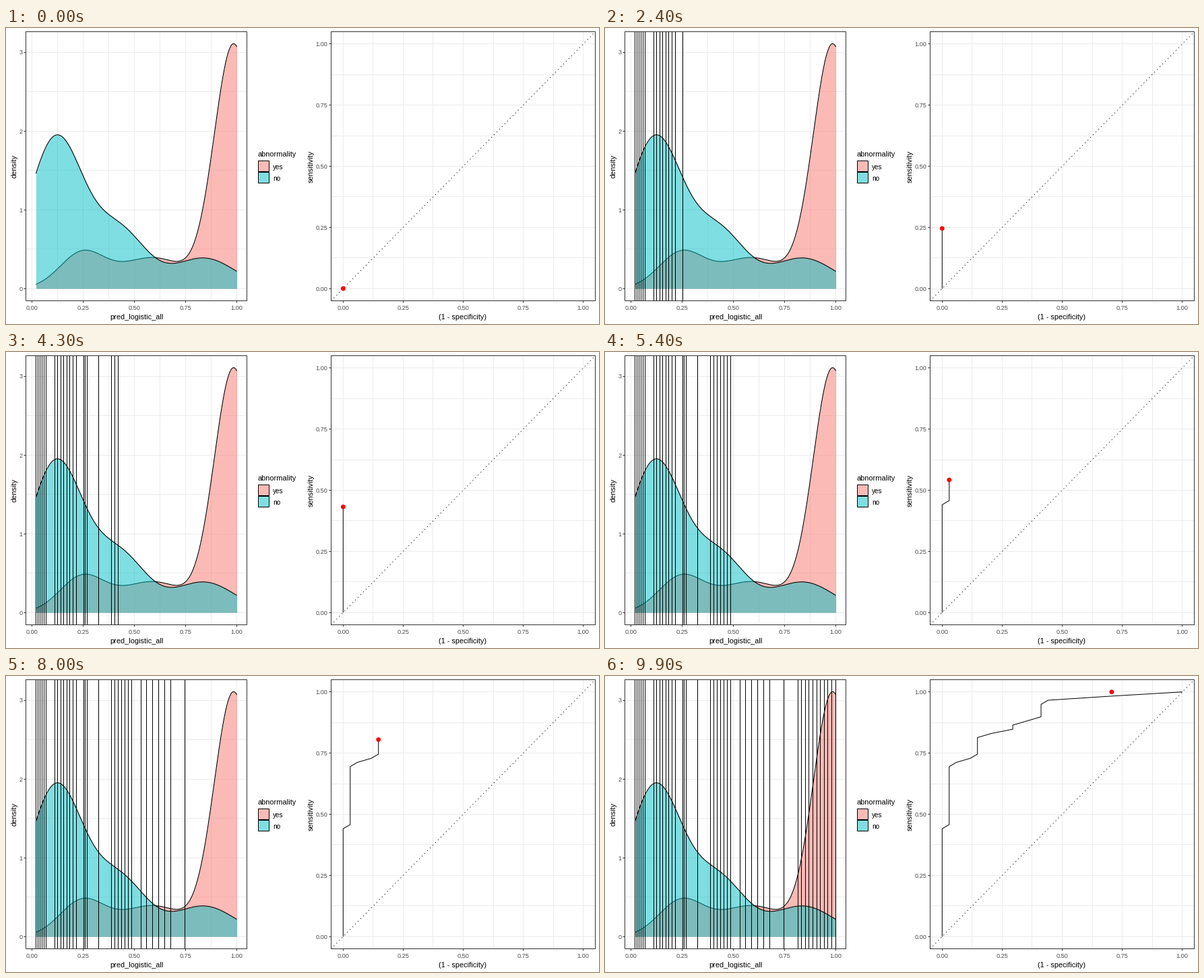
Write a matplotlib script that moves like this. It is 880 px wide and 440 px high and loops after 10000 ms.

```python
import numpy as np
import matplotlib.pyplot as plt
from matplotlib.animation import FuncAnimation
from matplotlib.patches import Circle, Rectangle

W, H, DPI = 880, 440, 100
FRAMES, INTERVAL = 100, 100
PX = 72 / DPI
RED, TEAL = "#F8766D", "#00BFC4"
GRID, DARK, TICK_TEXT = "#EBEBEB", "#333333", "#4D4D4D"
TOP, BOTTOM = 5.5, 405.5
LEFT_PANEL, RIGHT_PANEL = (29.5, 357.5), (482.5, 874.5)

plt.rcParams["font.family"] = "Liberation Sans"
fig = plt.figure(figsize=(W / DPI, H / DPI), dpi=DPI, facecolor="white")
ax = fig.add_axes([0, 0, 1, 1])
ax.set_xlim(0, W)
ax.set_ylim(H, 0)
ax.axis("off")


def scale(origin, unit):
    return lambda v: origin + unit * np.asarray(v, dtype=float)


dens_x, dens_y = scale(38.5, 304.1), scale(387.3, -117.1)
roc_x, roc_y = scale(500.3, 356.4), scale(387.3, -363.6)


def snap(v):
    """Centre of the pixel that holds v."""
    return np.floor(v) + 0.5


def line(xs, ys, color="black", width=1.0, z=3, **kw):
    return ax.plot(xs, ys, color=color, lw=width * PX, zorder=z, snap=False,
                   solid_capstyle="butt", **kw)[0]


def box(x, y, w, h, z, **kw):
    ax.add_patch(Rectangle((x, y), w, h, zorder=z, snap=False, **kw))


def label(x, y, text, size=11, color="black", ha="center", rotation=0):
    ax.text(x, y, text, fontsize=size * PX, color=color, ha=ha, va="baseline",
            rotation=rotation, rotation_mode="anchor", zorder=9)


def panel(span, fx, fy, xticks, yticks, xminor, yminor, yfmt):
    x0, x1 = span
    for v in [*xticks, *xminor]:
        line([snap(fx(v))] * 2, [TOP, BOTTOM], GRID, z=1)
    for v in [*yticks, *yminor]:
        line([x0, x1], [snap(fy(v))] * 2, GRID, z=1)
    for v in xticks:
        line([snap(fx(v))] * 2, [BOTTOM, BOTTOM + 3], DARK, z=8)
        label(fx(v), 418.8, f"{v:.2f}", 9.2, TICK_TEXT)
    for v in yticks:
        line([x0 - 3, x0], [snap(fy(v))] * 2, DARK, z=8)
        label(x0 - 5, fy(v) + 3.4, yfmt % v, 9.2, TICK_TEXT, "right")
    box(x0, TOP, x1 - x0, BOTTOM - TOP, 8, fill=False, ec=DARK, lw=PX)


def density(bumps, color, z):
    """Filled sum of bell curves given as (height, centre, spread)."""
    v = np.linspace(0.0195, 1, 400)
    y = sum(a * np.exp(-((v - c) / s) ** 2 / 2) for a, c, s in bumps)
    ax.fill_between(dens_x(v), dens_y(y), dens_y(0), color=color, alpha=0.5,
                    lw=0, zorder=z)
    line(dens_x(v), dens_y(y), width=1.1, z=z + 0.1)


quarters = np.arange(5) / 4
eighths = quarters[:-1] + 0.125
panel(LEFT_PANEL, dens_x, dens_y, quarters, range(4), eighths,
      np.arange(3) + 0.5, "%d")
panel(RIGHT_PANEL, roc_x, roc_y, quarters, quarters, eighths, eighths, "%.2f")

density([(0.445, 0.245, 0.11), (0.39, 0.59, 0.16), (3.09, 0.985, 0.096)],
        RED, 2)
density([(1.915, 0.118, 0.133), (0.704, 0.43, 0.127), (0.385, 0.84, 0.15)],
        TEAL, 2.5)

line(RIGHT_PANEL, [BOTTOM, TOP], dashes=(1.2, 4.46), dash_capstyle="butt")

label(193.5, 433, "pred_logistic_all")
label(15, 205.5, "density", rotation=90)
label(678, 433, "(1 - specificity)")
label(455.5, 205.5, "sensitivity", rotation=90)

label(374, 191, "abnormality", ha="left")
for y, color, name in [(197.5, RED, "yes"), (214.5, TEAL, "no")]:
    box(374.5, y, 16, 16, 3, fc=color, alpha=0.5, lw=0)
    box(374.5, y, 16, 16, 4, fill=False, ec="black", lw=PX)
    label(396, y + 12.8, name, 10, ha="left")

# Corners of the curve: true positives reached, false positives by then
POS, NEG = 59, 34
corner_tp = [0, 27, 42, 43, 44, 49, 50, 52, 53, 57, 58, 59]
corner_fp = np.array([0, 1, 2, 4, 5, 7, 10, 12, 14, 15, 24, 34])
hits = np.arange(POS + 1)
last = corner_fp[np.searchsorted(corner_tp, hits, side="right") - 1] / NEG
first = np.r_[0, last[:-1]]
sens = hits / POS
when = np.rint(sens * (FRAMES - 1))

# Thresholds run evenly between a few marks; each shows at its hit count
mark = [0, 5, 6, 13, 14, 16, 17, 18, 24, 25, 30, 32, 42]
mark_px = [44, 59, 72, 104, 115, 120, 137, 156, 186, 200, 244, 286, 342]
mark_hit = [1, 6, 7, 14, 14.5, 18, 21, 22, 32, 34, 43, 50, 59]
cuts = np.arange(mark[-1] + 1)
cut_px = snap(np.interp(cuts, mark, mark_px))
cut_start = np.rint(np.interp(cuts, mark, mark_hit) / POS * (FRAMES - 1))
cut_lines = [line([x, x], [TOP, BOTTOM], z=5) for x in cut_px]

curve = line([], [], z=6)
dot = ax.add_patch(Circle((0, 0), 3.4, color="red", lw=0, zorder=7))


def mix(a, b, t):
    return a + t * (b - a)


def update(frame):
    for artist, start in zip(cut_lines, cut_start):
        artist.set_visible(frame >= start)
    k = np.searchsorted(when, frame, side="right") - 1
    nxt = min(k + 1, POS)
    t = (frame - when[k]) / max(when[nxt] - when[k], 1)
    x, y = mix(first[k], last[nxt], t), mix(sens[k], sens[nxt], t)
    tip = mix(last[k], first[nxt], t)
    curve.set_data(roc_x(np.r_[last[:k + 1], tip]),
                   roc_y(np.r_[sens[:k + 1], y]))
    dot.center = roc_x(x), roc_y(y)
    return [curve, dot, *cut_lines]


anim = FuncAnimation(fig, update, frames=FRAMES, interval=INTERVAL,
                     repeat=True, repeat_delay=0, blit=False)
plt.show()
```
